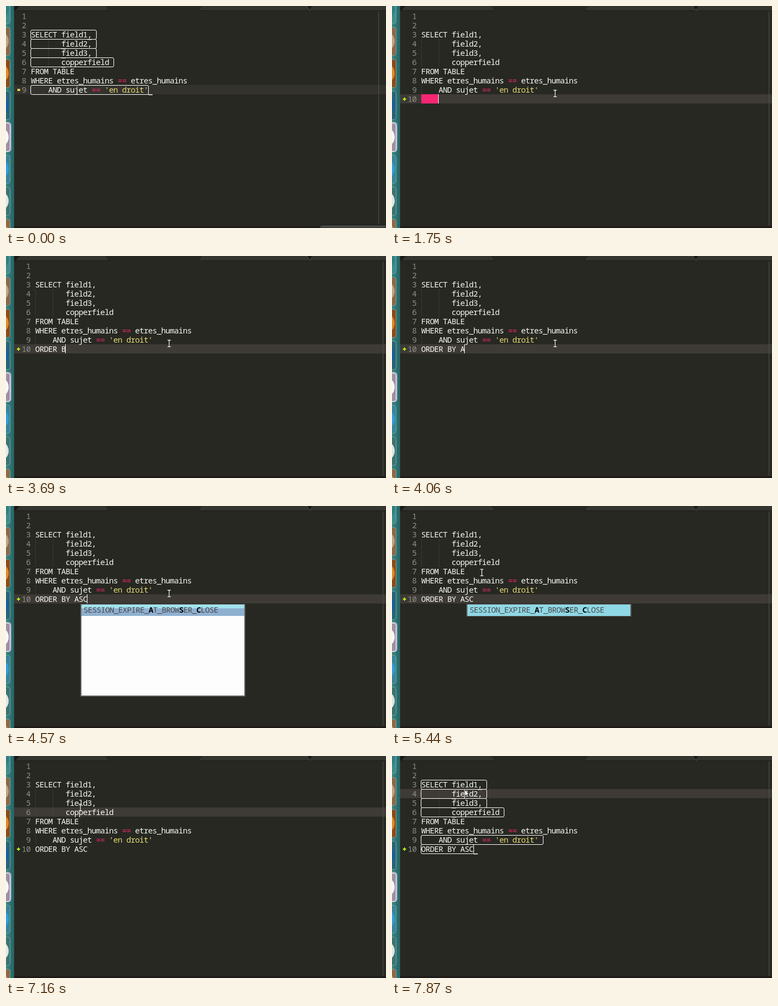
Recreate the animation shown at these times as an HTML page. Size 700 px wide and 410 px high, loop 8000 ms.

```html
<!DOCTYPE html>
<html lang="en">
<head>
<meta charset="utf-8">
<title>Editor</title>
<style>
  html, body { margin: 0; width: 100%; height: 100%; overflow: hidden; background: #272822; }
  svg { display: block; width: 700px; height: 410px; }
  text { font: 500 14.5px "Noto Sans Mono", "DejaVu Sans Mono", monospace; letter-spacing: -.7px; fill: #f8f8f2; white-space: pre; }
  .num { fill: #8f908a; font-weight: 400; text-anchor: end; }
  .op { fill: #f92672; }
  .str { fill: #e6db74; }
  .guide { stroke: #4a4a42; stroke-dasharray: 1 1; }
  .box { fill: none; stroke: #fff; }
  .word { fill: #4a4a4a; font-weight: 400; }
  .hit { fill: #000; font-weight: 700; }
</style>
</head>
<body>
<svg viewBox="0 0 700 410">
  <defs>
    <linearGradient id="teal" x2="1" y2="0">
      <stop offset="0" stop-color="#3b8583"/><stop offset="1" stop-color="#266363"/>
    </linearGradient>
  </defs>
  <rect width="700" height="410" fill="#272822"/>
  <rect id="band" x="15" width="685" height="17"/>
  <g id="code">
    <path id="ruler" d="M640.5 10V406" stroke="#52524b"/>
  </g>
  <g id="marks">
    <rect id="changed" x="21" y="153" width="5" height="4" fill="#e8d44d"/>
    <path id="added" d="M20 172H26M23 169V175" stroke="#b6f01a" stroke-width="2"/>
  </g>
  <g id="tabs">
    <rect x="15" width="685" height="8" fill="#191a17"/>
    <path d="M15 9C20 9 22 0 27 0H182C186 0 186 8 191 9ZM353 9C358 8 358 0 363 0H552C557 0 557 8 562 9ZM556 9C561 8 561 0 566 0H700V9Z" fill="#353530"/>
    <path d="M182 0C186 0 186 9 192 9H353C358 9 358 0 363 0Z" fill="#272822"/>
    <path d="M15 8.500H190M354 8.500H700" stroke="#1c1c19"/>
    <path d="M552 0C557 0 557 8 562 8.500" fill="none" stroke="#55554e"/>
  </g>
  <rect x="15" y="407" width="685" height="3" fill="#1d1918"/>
  <path id="panel" d="M578 410V408Q579 404.500 584 404.500H700V410Z" fill="#484845" stroke="#191917"/>
  <g id="dock"><rect width="15" height="410" fill="url(#teal)"/></g>
  <g id="popup"></g>
  <rect id="caret" width="1" height="17" fill="#fff"/>
  <g id="beam" fill="none">
    <path d="M-3-6H3M0-6V6M-3 6H3" stroke="#111" stroke-width="2.500"/>
    <path d="M-3-6H3M0-6V6M-3 6H3" stroke="#fff" stroke-width="1.300"/>
  </g>
  <path id="arrow" transform="translate(134 62)" d="M0 0V12L2.700 9.500L4.500 14L6.500 13L4.700 8.800H8Z" fill="#fff" stroke="#111" stroke-width=".8"/>
</svg>
<script>
const LOOP = 8000, CHAR = 8, ROW = 17;
const $ = id => document.getElementById(id);
const rowTop = n => 10 + (n - 1) * ROW;

function add(parent, tag, attrs = {}, content) {
  const el = document.createElementNS('http://www.w3.org/2000/svg', tag);
  for (const key in attrs) el.setAttribute(key, attrs[key]);
  if (content !== undefined) el.textContent = content;
  parent.appendChild(el);
  return el;
}
const show = (el, on) => { el.style.display = on ? '' : 'none'; };
// Last entry of a [time, ...] table that has begun.
const current = (table, t) => table.filter(entry => entry[0] <= t).pop();

// Code
const code = $('code');
const lines = ['', '', 'SELECT field1,', '       field2,', '       field3,', '       copperfield',
  'FROM TABLE', 'WHERE etres_humains == etres_humains', "    AND sujet == 'en droit'", ''];
const numbers = [], rows = [];
lines.forEach((line, i) => {
  const n = i + 1, y = rowTop(n) + 14;
  numbers.push(add(code, 'text', { x: -9, y, class: 'num' }, n));
  const row = add(code, 'text', { x: -.35, y });
  for (const part of line.split(/(==|'.*')/)) {
    add(row, 'tspan', { class: part === '==' ? 'op' : part[0] === "'" ? 'str' : '' }, part);
  }
  rows.push(row);
});
add(code, 'path', { class: 'guide', d: 'M.5 61V112M32.500 61V112M.5 146V163' });

const trailing = add(code, 'g');
add(trailing, 'rect', { y: 163, width: 32, height: 17, rx: 1, fill: '#f92672' });
for (let i = 0; i < 4; i++) add(trailing, 'rect', { x: 3 + i * CHAR, y: 172, width: 1, height: 1, fill: '#b8486c' });

// Each warning: row, boxed columns, underlined column
function warnings(list) {
  const g = add(code, 'g');
  for (const [n, columns, under] of list) {
    const y = rowTop(n);
    add(g, 'rect', { class: 'box', x: -.5, y: y + .5, width: columns * CHAR + 1, height: ROW, rx: 2.5 });
    if (under >= 0) add(g, 'rect', { x: under * CHAR, y: y + ROW, width: CHAR, height: 1.5, fill: '#fff' });
  }
  return g;
}
const shared = [[3, 15, 13], [4, 15, 7], [5, 15, 7], [6, 19, 7]];
const before = warnings([...shared, [9, 27, 27]]);
const after = warnings([...shared, [9, 28, -1], [10, 12, 12]]);

// Dock: tile colour, icon colour
[['#3f8c8c', '#2f7f86'], ['#8a6848', '#b9a48a'], ['#8a4c1c', '#e08a22'], ['#2b6478', '#17609c'],
 ['#a08fa8', '#f6f8fa'], ['#3a8499', '#2f9fdc'], ['#3c7473', '#dfe6e4'], ['#8c6a48', '#c79a62']]
.forEach(([tile, icon], i) => {
  const y = i * 59 - 20, active = i === 4;
  if (active) add($('dock'), 'rect', { x: -46, y: y - 2, width: 56, height: 56, rx: 6, fill: '#dcc8e4', opacity: .6 });
  add($('dock'), 'rect', { x: -44, y: y + .5, width: 51.5, height: 52, rx: 4, fill: tile, stroke: active ? '#fff' : '#6fa3a0' });
  add($('dock'), 'circle', { cx: -14, cy: y + 26, r: 19, fill: icon });
});

// Typing on the last row
const typed = [[0, ''], [1600, '    '], [2090, ''], [2600, 'O'], [2740, 'OR'], [2880, 'ORD'], [3060, 'ORDE'],
  [3250, 'ORDER'], [3510, 'ORDER '], [3690, 'ORDER B'], [3850, 'ORDER BY'], [3960, 'ORDER BY '],
  [4060, 'ORDER BY A'], [4370, 'ORDER BY AS'], [4570, 'ORDER BY ASC']];

// Completion: fuzzy matches of the prefix; the frame follows the list with a delay
const words = ['copperfield', 'AND', 'TABLE', 'etres_humains', 'SESSION_EXPIRE_AT_BROWSER_CLOSE', 'droit',
  'FROM', 'DATABASES', 'BASE_DIR', 'MEDIA_URL', 'STATIC_URL'];
function match(word, prefix) {
  const hits = [];
  let from = 0;
  for (const letter of prefix.toLowerCase()) {
    const at = word.toLowerCase().indexOf(letter, from);
    if (at < 0) return null;
    hits.push(at);
    from = at + 1;
  }
  return { word, hits };
}
const matches = prefix => words.map(word => match(word, prefix)).filter(Boolean);
const completions = [[0], [2640, 66, 'O', 'O'], [2740, 66, 'OR', 'O'], [2790, 66, 'OR', 'OR'], [2880, 66, 'ORD', 'OR'],
  [2930, 66, 'ORD', 'ORD'], [3060], [3730, 114, 'B', 'B'], [3850], [4100, 138, 'A', 'A'],
  [4370, 138, 'AS', 'A'], [4570, 138, 'ASC', 'A'], [4620, 138, 'ASC', 'ASC'], [6340]];
const popup = $('popup');
let shown;
function drawPopup(entry) {
  if (entry === shown) return;
  shown = entry;
  popup.replaceChildren();
  const [, x, prefix, framePrefix] = entry;
  if (!x) return;
  const count = Math.min(8, matches(framePrefix).length), single = count === 1;
  const height = count * 21 + (single ? 0 : 1);
  add(popup, 'rect', { x, y: 182, width: 302, height, fill: '#fdfdfd', stroke: '#62625f', 'stroke-width': 2 });
  add(popup, 'rect', { x: x + 1, y: 182, width: 300, height: 21, fill: single ? '#8fd8e6' : '#8fb0d0' });
  add(popup, 'rect', { x: x + 1, y: 182, width: 300, height: 7, fill: single ? '#8fd8e6' : '#a2e2ee' });
  matches(prefix).slice(0, count).forEach(({ word, hits }, i) => {
    const label = add(popup, 'text', { x: x + 4.65, y: 197 + i * 21, class: 'word' });
    [...word].forEach((letter, k) => add(label, 'tspan', { class: hits.includes(k) ? 'hit' : 'word' }, letter));
  });
}

// Pointer
const path = [[480, 193, 322], [840, 291, 170], [990, 291, 170], [1340, 300.5, 161.5], [4850, 300.5, 161.5],
  [5650, 138, 115], [5700, 138, 115], [6200, 115.5, 102.5], [6660, 115.5, 102.5], [7160, 137, 95],
  [7340, 137, 95], [7700, 137, 69]];
function pointer(t) {
  const i = path.findIndex(p => p[0] > t);
  if (i < 0) return path[path.length - 1].slice(1);
  const [t0, x0, y0] = path[i - 1], [t1, x1, y1] = path[i];
  const u = (t - t0) / (t1 - t0), e = u * u * (3 - 2 * u);
  return [x0 + (x1 - x0) * e, y0 + (y1 - y0) * e];
}

const bands = [[0, 9], [1600, 10], [6200, 6], [7600, 4]];
const clicks = [[0, 27], [6200, 8], [7600, 10]];
const fade = (t, start, end) => Math.max(0, Math.min(1, (end - t) / (end - start)));

function render(t) {
  const grown = t >= 1600, left = grown ? 54 : 46;
  const [typedAt, text] = current(typed, t), [, row] = current(bands, t);

  code.setAttribute('transform', `translate(${left})`);
  show(numbers[9], grown);
  rows[9].textContent = text;
  show(trailing, t >= 1750 && t < 2090);
  show(before, t < 1680);
  show(after, t >= 7870);
  show($('changed'), t < 1750);
  show($('added'), t >= 1750 && t < 2260 || t >= 2600);

  $('band').setAttribute('y', rowTop(row));
  $('band').setAttribute('fill', t < 990 ? '#33322d' : '#3e3a36');
  $('panel').style.opacity = fade(t, 990, 1340);

  drawPopup(current(completions, t));
  popup.style.opacity = fade(t, 6240, 6340);

  const [clickedAt, clickColumn] = current(clicks, t);
  const column = row === 10 ? text.length : clickColumn;
  const since = t - Math.max(typedAt, clickedAt, t < 1600 ? 1100 : 0);
  $('caret').setAttribute('x', left + column * CHAR - 1);
  $('caret').setAttribute('y', rowTop(row));
  show($('caret'), since >= 0 && since % 1000 < 500);

  const arrow = t >= 7870;
  show($('arrow'), arrow);
  show($('beam'), t >= 480 && !arrow);
  if (t >= 480) $('beam').setAttribute('transform', `translate(${pointer(t)})`);
}

function tick() {
  render(performance.now() % LOOP);
  requestAnimationFrame(tick);
}
tick();
</script>
</body>
</html>
```
